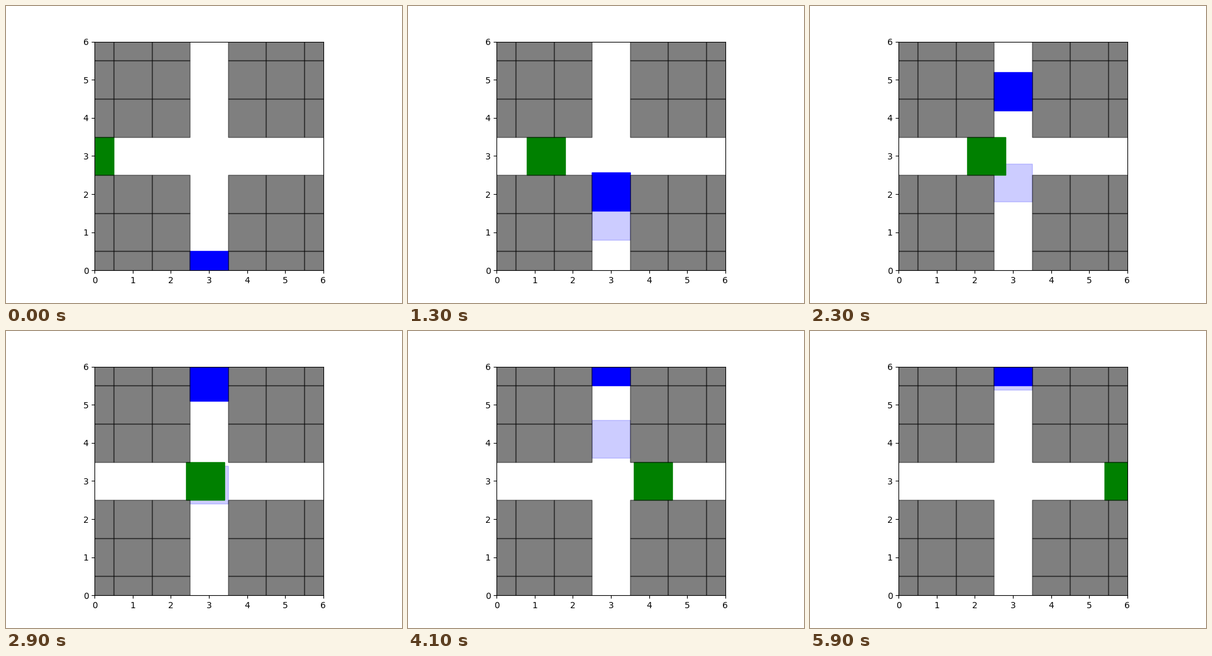
Write a matplotlib script that moves like this. It is 640x480 px and loops after 6000 ms.

```python
import matplotlib.pyplot as plt
from matplotlib.animation import FuncAnimation
from matplotlib.patches import Rectangle

FRAMES = 60
INTERVAL = 100
SPEED = 0.1  # cells per frame for the steady movers

# Fast mover: (frame, position, velocity), joined by cubic Hermite pieces
KNOTS = [
    (0, 0.0, 0.0),
    (8, 0.72, 0.245),
    (17, 3.2, 0.275),
    (21, 4.245, 0.245),
    (29, 5.6, 0.095),
    (35, 5.925, 0.026),
    (42, 6.0, 0.0),
]


def fast_position(t):
    for (t0, y0, v0), (t1, y1, v1) in zip(KNOTS, KNOTS[1:]):
        if t <= t1:
            h = t1 - t0
            s = (t - t0) / h
            rise = s * s * (3 - 2 * s)
            return (y0 + (y1 - y0) * rise
                    + h * v0 * s * (1 - s) ** 2
                    - h * v1 * s * s * (1 - s))
    return KNOTS[-1][1]


fig, ax = plt.subplots(figsize=(6.4, 4.8), dpi=100)
ax.set_aspect("equal")
ax.set_xlim(0, 6)
ax.set_ylim(0, 6)
ax.set_xticks(range(7))
ax.set_yticks(range(7))


def add_cell(x, y, color, alpha=1.0):
    """Unit square centred on (x, y)."""
    return ax.add_patch(Rectangle((x - 0.5, y - 0.5), 1, 1,
                                  color=color, alpha=alpha, linewidth=1))


ghost = add_cell(3, 0, "blue", 0.2)
blue = add_cell(3, 0, "blue")
green = add_cell(0, 3, "green")

# Blocks lie over the movers, so their outlines shade the road edges
for col in range(7):
    for row in range(7):
        if col != 3 and row != 3:
            add_cell(col, row, "black", 0.5)


def update(i):
    steady = SPEED * i
    ghost.set_y(steady - 0.5)
    green.set_x(steady - 0.5)
    blue.set_y(fast_position(i) - 0.5)
    return ghost, blue, green


anim = FuncAnimation(fig, update, frames=FRAMES, interval=INTERVAL,
                     repeat=True, repeat_delay=0, blit=False)
plt.show()
```
